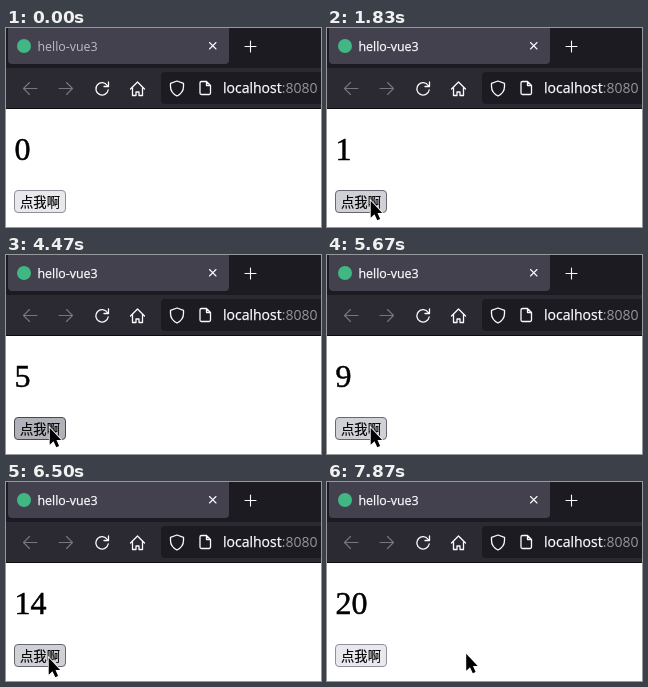
Recreate the animation shown at these times as an HTML page. Size 315 by 199 pixels, loop 8000 ms.

```html
<!DOCTYPE html>
<html lang="zh">
<head>
<meta charset="utf-8">
<title>hello-vue3</title>
<style>
  html, body { margin: 0; width: 100%; height: 100%; overflow: hidden; background: #fff; }
  svg { display: block; width: 315px; height: 199px; }
  .ui { font-family: "Open Sans", "Noto Sans", sans-serif; }
  .icon { fill: none; stroke: #fbfbfe; stroke-width: 1.3; stroke-linecap: round; stroke-linejoin: round; }
  .thin { stroke-width: 1.1; }
  .dim { stroke: #77767f; }
  #title { fill: #bebdc6; font-size: 12.4px; }
  #title.active { fill: #fbfbfe; stroke: #fbfbfe; stroke-width: .25px; }
  #host { fill: #fbfbfe; stroke: #fbfbfe; stroke-width: .25px; }
  #port { fill: #96959e; }
  #count { font: 32px "Liberation Serif", "Times New Roman", serif; stroke: #000; stroke-width: .5px; }
  #button rect { fill: #e9e9ed; stroke: #8f8f9d; }
  #button.hover rect { fill: #d0d0d7; stroke: #676774; }
  #button.press rect { fill: #b1b1b9; stroke: #484851; }
  #button text { font: 13.33px "Noto Sans CJK SC", "Noto Sans CJK", sans-serif; stroke: #000; stroke-width: .15px; }
  #cursor { stroke: #fff; stroke-width: 1.6; paint-order: stroke; }
</style>
</head>
<body>
<svg viewBox="0 0 315 199">
  <rect width="315" height="81" fill="#1c1b22"/>
  <rect x="2" y="-4" width="221" height="40" rx="4" fill="#42414d"/>
  <circle cx="18" cy="18" r="7" fill="#41b883"/>
  <text id="title" class="ui" x="31.5" y="22.5">hello-vue3</text>
  <path class="icon thin" d="M203.5 14.5l6.5 6.500m0-6.500l-6.500 6.500M239 18.5h11m-5.5-5.5v11"/>

  <rect y="40" width="315" height="40" fill="#2b2a33"/>
  <rect y="80" width="315" height="1" fill="#0c0c0d"/>
  <rect x="155" y="44" width="170" height="32" rx="4" fill="#1c1b22"/>
  <path class="icon thin dim" d="M31 60.5H17.5m6-6l-6 6 6 6M53 60.5h13.5m-6-6l6 6-6 6"/>
  <path class="icon" d="M101.3 57.5a6.200 6.200 0 1 0 .9 4.500M102.500 54v4.500H98"/>
  <path class="icon" d="M124.500 61l7-7 7 7M126.500 59.500v8h3.500V64h3v3.500h3.500v-8"/>
  <path class="icon" d="M171 53l6.500 2.300v3.200c0 4.300-2.500 7.500-6.500 9.500-4-2-6.500-5.200-6.500-9.500v-3.200z"/>
  <path class="icon" d="M195.500 53.500h5l4 4v7.500a1.500 1.500 0 0 1-1.500 1.500h-7.500a1.500 1.500 0 0 1-1.500-1.500v-10a1.500 1.500 0 0 1 1.500-1.500zM200.500 53.500v4h4"/>
  <text class="ui" x="217" y="65" font-size="14"><tspan id="host">localhost</tspan><tspan id="port">:8080</tspan></text>

  <text id="count" x="8.500" y="132">0</text>
  <g id="button">
    <rect x="8.500" y="162.500" width="51" height="22" rx="3.500"/>
    <text x="14" y="178.500">点我啊</text>
  </g>
  <path id="cursor" d="M.7-.3v17l3.800-3.500 2.800 6 2.800-1.200-2.600-6h4.700z"/>
</svg>
<script>
  const LOOP = 8000, FPS = 30;
  const ENTER = 500, SLOW = 9, CLICKS = 20;
  const [title, count, button, cursor] =
    ["title", "count", "button", "cursor"].map(id => document.getElementById(id));

  // unhurried clicks that speed up, then a rapid burst
  function click(i) {
    const k = i - SLOW;
    const down = k < 0 ? 1800 + 635 * i - 20.5 * i * i : 5770 + 175 * k - 2.9 * k * k;
    return { down, up: down + (k < 0 ? Math.min(100, 30 + 35 * i) : 66) };
  }
  const clicks = Array.from({ length: CLICKS }, (_, i) => click(i));

  const moves = [
    { from: ENTER, to: 970, x: 45, y: 173 },
    { from: 1170, to: 1300, x: 43, y: 173 },
    { from: 5700, to: 5730, x: 42, y: 176 },
    { from: 6970, to: 7170, x: 42, y: 180 },
    { from: 7700, to: 7870, x: 138.5, y: 172 }
  ];
  const easeOut = p => 1 - (1 - p) ** 2;

  function pointer(t) {
    const now = (Math.floor((t + 4) * FPS / 1000) + 1) * 1000 / FPS;
    let x = 318, y = 190;
    for (const m of moves) {
      if (t < m.from) break;
      const p = easeOut(Math.min(1, (now - m.from) / (m.to - m.from)));
      x += (m.x - x) * p;
      y += (m.y - y) * p;
    }
    return { x, y };
  }

  function draw(t) {
    const { x, y } = pointer(t);
    const shown = t >= ENTER;
    const over = shown && x >= 8 && x < 60 && y >= 162 && y < 185;
    const pressed = clicks.some(c => t >= c.down && t < c.up);
    title.classList.toggle("active", t >= clicks[0].down);
    count.textContent = clicks.filter(c => c.up <= t).length;
    button.setAttribute("class", pressed ? "press" : over ? "hover" : "");
    cursor.setAttribute("visibility", shown ? "visible" : "hidden");
    cursor.setAttribute("transform", `translate(${x} ${y})`);
  }

  const start = performance.now();
  function tick() {
    draw((performance.now() - start) % LOOP);
    requestAnimationFrame(tick);
  }
  tick();
</script>
</body>
</html>
```
